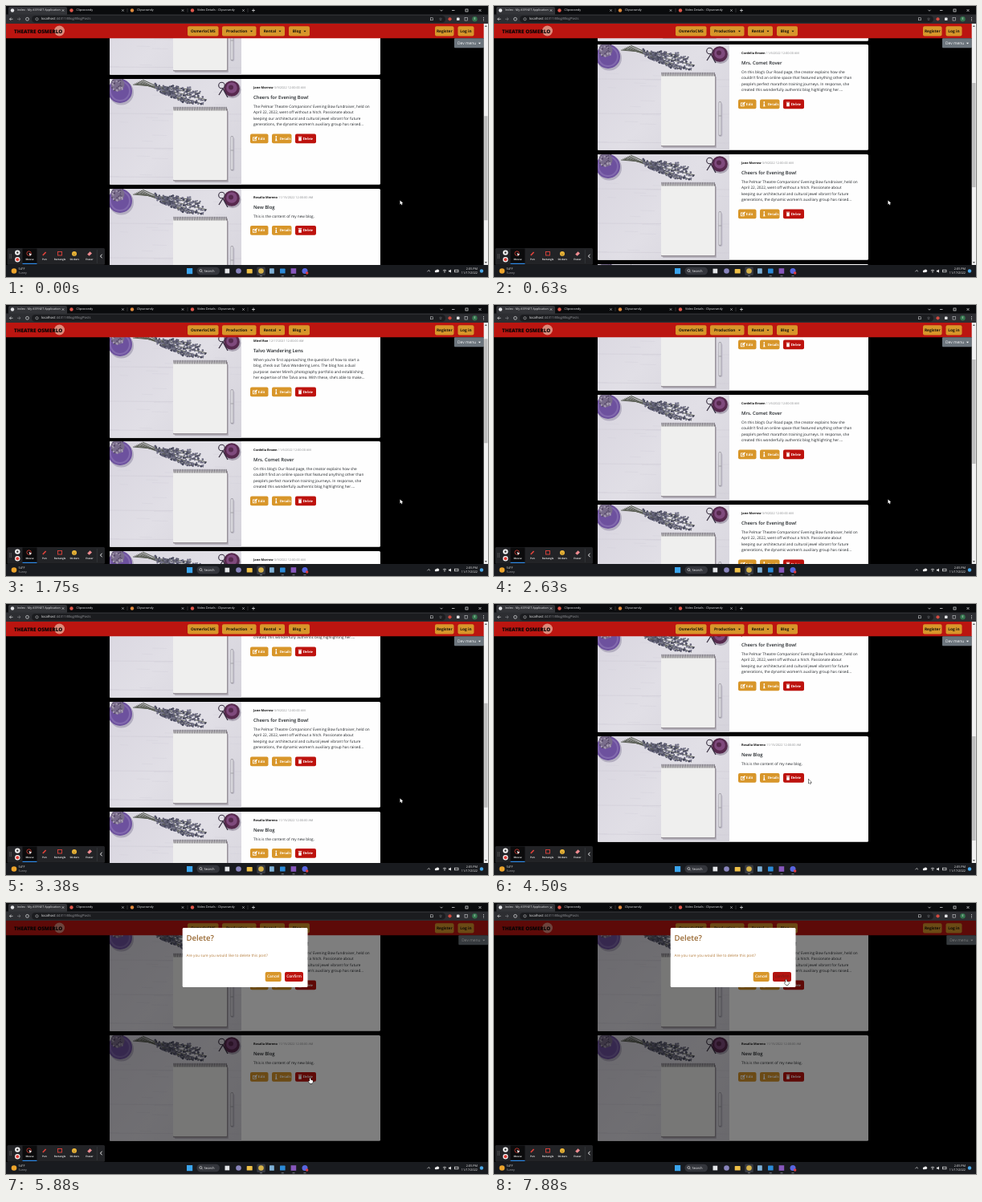
Write an HTML page with a canvas that moves like this. It is 600x338 px and loops after 8 s.

```html
<!DOCTYPE html>
<html lang="en">
<head>
<meta charset="utf-8">
<title>Blog posts</title>
<style>
html, body { margin: 0; width: 100%; height: 100%; overflow: hidden; background: #000; }
canvas { display: block; width: 600px; height: 338px; }
</style>
</head>
<body>
<canvas id="stage"></canvas>
<script>
const LOOP = 8000, STEP = 125, PITCH = 136.7, CARD_H = 131.7;
const GOLD = '#d8962a', RED = '#bd120d', SANS = '"Open Sans", sans-serif', SERIF = '"Liberation Serif", serif';
const canvas = document.getElementById('stage');
const dpr = window.devicePixelRatio || 1;
canvas.width = 600 * dpr;
canvas.height = 338 * dpr;
const c = canvas.getContext('2d');
c.scale(dpr, dpr);
c.textRendering = 'geometricPrecision';

const cards = [
  { who: 'Mirel Roe', date: '12/17/2021', title: 'Talvo Wandering Lens', body: [
    'When you\u2019re first approaching the question of how to start a',
    'blog, check out Talvo Wandering Lens. The blog has a dual',
    'purpose: owner Mirel\u2019s photography portfolio and establishing',
    'her expertise of the Talvo area. With these, she\u2019s able to make...'] },
  { who: 'Cordelia Brown', date: '11/6/2022', title: 'Mrs. Comet Rover', body: [
    'On this blog\u2019s Our Road page, the creator explains how she',
    'couldn\u2019t find an online space that featured anything other than',
    'people\u2019s perfect marathon training journeys. In response, she',
    'created this wonderfully authentic blog highlighting her....'] },
  { who: 'Jane Morrow', date: '5/9/2022', title: 'Cheers for Evening Bow!', body: [
    'The Pelmar Theatre Companions\u2019 Evening Bow fundraiser, held on',
    'April 22, 2022, went off without a hitch. Passionate about',
    'keeping our architectural and cultural jewel vibrant for future',
    'generations, the dynamic women\u2019s auxiliary group has raised...'] },
  { who: 'Rosalia Moreno', date: '11/15/2022', title: 'New Blog', body: ['This is the content of my new blog.'] }
];

// Keyframes: [time, value...]
const scrollKeys = [[0, 91], [625, 185], [1750, 307], [2000, 312], [2250, 312], [3375, 122], [3875, 28]];
const mouseKeys = [[0, 490.5, 242.5], [4000, 490.5, 242.5], [4500, 391.5, 218.5], [4750, 378.5, 218.5],
  [6125, 378.5, 218.5], [6875, 366, 108], [7125, 363.5, 95.5]];

function track(keys, t) {
  const i = keys.findIndex(k => k[0] > t);
  if (i < 0) return keys[keys.length - 1].slice(1);
  const a = keys[i - 1], b = keys[i], p = (t - a[0]) / (b[0] - a[0]);
  return a.slice(1).map((v, j) => v + (b[j + 1] - v) * p);
}

function rect(x, y, w, h, fill, r = 0) {
  c.fillStyle = fill;
  c.beginPath();
  c.roundRect(x, y, w, h, r);
  c.fill();
}
function disc(x, y, r, fill) {
  c.fillStyle = fill;
  c.beginPath();
  c.arc(x, y, r, 0, 7);
  c.fill();
}
function ring(x, y, r, color, width) {
  c.strokeStyle = color;
  c.lineWidth = width;
  c.beginPath();
  c.arc(x, y, r, 0, 7);
  c.stroke();
}
function line(color, width, ...p) {
  c.strokeStyle = color;
  c.lineWidth = width;
  c.beginPath();
  for (let i = 0; i < p.length; i += 2) c.lineTo(p[i], p[i + 1]);
  c.stroke();
}
function shape(fill, ...p) {
  c.fillStyle = fill;
  c.beginPath();
  for (let i = 0; i < p.length; i += 2) c.lineTo(p[i], p[i + 1]);
  c.closePath();
  c.fill();
}
function text(s, x, y, size, color, weight = 400, align = 'left', family = SANS) {
  c.font = `${weight} ${size}px ${family}`;
  c.fillStyle = color;
  c.textAlign = align;
  c.textBaseline = 'middle';
  c.fillText(s, x, y);
  return c.measureText(s).width;
}
function caret(x, y, color) { shape(color, x - 1.5, y - .8, x + 1.5, y - .8, x, y + .9); }

function photo() {
  c.save();
  c.beginPath();
  c.rect(0, 0, 164, CARD_H);
  c.clip();
  const wood = c.createLinearGradient(0, 0, 164, CARD_H);
  wood.addColorStop(0, '#d8d5df');
  wood.addColorStop(.5, '#e1dfe6');
  wood.addColorStop(1, '#d5d3db');
  rect(0, 0, 164, CARD_H, wood);
  for (const y of [43, 86, 122]) line('#cfccd6', .6, 0, y, 164, y + 1);

  let seed = 7;
  const rnd = () => (seed = seed * 16807 % 2147483647) / 2147483647;
  for (let i = 0; i < 30; i++) {
    const x = rnd() * 160, y = rnd() * CARD_H;
    line('#d1ced8', .4, x, y, x + 8 + rnd() * 16, y + .5);
  }

  // lavender stems and heads
  const tips = [[102, 13], [113, 18], [121, 26], [117, 32], [104, 31], [92, 28], [82, 20]];
  tips.forEach(([x, y], i) => {
    const sx = 29 + i * 2, sy = 7 - i;
    line('#5d6158', 1.1, sx, sy, x, y);
    for (let k = 0; k < 42; k++) {
      const p = .38 + rnd() * .62;
      disc(sx + (x - sx) * p, sy + (y - sy) * p + (rnd() - .5) * 5, .7 + rnd() * .8,
        ['#45465a', '#5c5b70', '#747389'][k % 3]);
    }
  });

  // pot of blossoms
  disc(14.5, 17, 15.5, '#b3aec0');
  disc(13, 15, 15, '#6d519e');
  ring(13, 15, 12, '#8269ae', 2);
  disc(10, 7, 8.5, '#7a6d8c');
  for (let k = 0; k < 30; k++) disc(3 + rnd() * 14, rnd() * 15, 1, k % 2 ? '#aaa0b4' : '#574a68');

  // candle and twine
  disc(153, 13.5, 10.5, '#aaa4b3');
  disc(152, 12, 9.8, '#56294d');
  disc(152, 11, 6.8, '#7f4a7d');
  disc(151, 10.5, 3, '#56294d');
  ring(139.5, 8, 3.8, '#352c3e', 1.1);
  line('#352c3e', 1.3, 141, 12, 136, 20);
  line('#352c3e', 1.3, 141, 12, 147, 23);

  // notepad
  rect(81, 40, 67, 89, '#b5b1bb', 1);
  rect(79, 37, 68, 90.5, '#99939a', 1);
  rect(79, 37, 67, 89, '#efefee', .8);
  for (let x = 80; x < 146; x += 2.1) line('#4b474f', .9, x, 34.8, x + .4, 39.5);

  // pen
  rect(151.5, 73, 4, 42, '#c1becb', 2);
  rect(150.5, 71, 3.7, 43.5, '#a3a1a9', 1.7);
  rect(151.2, 72, 2.2, 41, '#dddce1', 1);
  line('#85838b', .6, 150.5, 89, 154.2, 89);
  c.restore();
}

function cardButton(x, y, w, label, fill) {
  rect(x, y, w, 11.7, fill, 2);
  text(label, x + 9.7, y + 6, 4.7, '#fff', 700, 'left', SERIF);
}

function card({ who, date, title, body }, top) {
  const y = Math.round(top);
  if (y > 323 || y + CARD_H < 22) return;
  c.save();
  c.translate(129, y);
  rect(0, 0, 337, CARD_H, '#fefefe', 1.5);
  photo();
  const w = text(who, 179, 10.7, 3.9, '#111', 700);
  text(`${date} 12:00:00 AM`, 180.2 + w, 10.7, 3.8, '#85878a');
  text(title, 179, 23.3, 5.9, '#212529', 600);
  body.forEach((s, i) => text(s, 179, 34.7 + i * 7.5, 4.72, '#212529'));
  const by = 46 + (body.length - 1) * 7.5;
  cardButton(175, by, 22.5, 'Edit', GOLD);
  cardButton(202, by, 24.5, 'Details', GOLD);
  cardButton(231, by, 26, 'Delete', RED);
  // pencil, info and bin
  c.strokeStyle = '#fff';
  c.lineWidth = .8;
  c.strokeRect(178.5, by + 4.4, 3.8, 3.9);
  line('#fff', 1.3, 180.3, by + 6.8, 183.5, by + 3.4);
  disc(207.3, by + 3.5, .9, '#fff');
  rect(206.6, by + 4.9, 1.4, 3.6, '#fff');
  rect(206, by + 8, 2.7, .8, '#fff');
  rect(234.8, by + 3.2, 4.4, .9, '#fff');
  rect(235.2, by + 4.5, 3.6, 4.3, '#fff', .4);
  c.restore();
}

function navButton(x, w, label, menu) {
  rect(x, 25.2, w, 12.4, GOLD, 2);
  text(label, x + w / 2 - (menu ? 3 : 0), 31.3, 4.8, '#17120a', 700, 'center');
  if (menu) caret(x + w - 6, 31.5, '#17120a');
}

function page(y, modal) {
  rect(0, 22, 600, 301, '#000');
  cards.forEach((item, i) => card(item, y + (i - 2) * PITCH));
  rect(0, 22, 600, 18.3, '#bb1510');
  disc(66.5, 31, 6.5, '#dc8a7a');
  text('THEATRE OSMERLO', 10, 32, 6.3, '#0c0606', 800);
  navButton(226, 38.5, 'OsmerloCMS');
  navButton(269, 42.5, 'Production', true);
  navButton(316, 31, 'Rental', true);
  navButton(352, 26, 'Blog', true);
  navButton(534, 23.5, 'Register');
  navButton(562.5, 20, 'Log in');
  const shift = modal ? 5.3 : 0;
  rect(558 + shift, 40.3, 36.7, 12, '#6c757d', 1);
  text('Dev menu', 562 + shift, 46.3, 4.9, '#fff');
  caret(589.5 + shift, 46.5, '#fff');
  if (!modal) {
    rect(594.7, 22, 5.3, 301, '#f1f1f1');
    rect(595.2, 165 - (y - 28) * .44, 4.3, 130, '#bdbdbd');
    shape('#555', 595.9, 26, 598.9, 26, 597.4, 24);
    shape('#555', 595.9, 319, 598.9, 319, 597.4, 321);
  }
}

function dialog(p, hover) {
  rect(0, 22, 600, 301, `rgba(0,0,0,${.5 * p})`);
  c.save();
  c.globalAlpha = p;
  c.beginPath();
  c.rect(0, 22, 600, 301);
  c.clip();
  c.translate(0, -15 * (1 - p));
  rect(219.7, 31, 155.8, 74, '#fff', 1.5);
  text('Delete?', 224.5, 44.5, 9.6, '#97662f', 600);
  text('Are you sure you would like to delete this post?', 224.5, 65.3, 4.65, '#b47c3c');
  rect(322.7, 86, 20, 12, GOLD, 2);
  text('Cancel', 332.7, 92.2, 4.8, '#fff', 600, 'center');
  rect(347, 86, 23, 12, hover ? '#b3140f' : RED, 2);
  text('Confirm', 358.5, 92.2, 4.8, hover ? '#7c1b16' : '#fff', 600, 'center');
  c.restore();
}

function browser() {
  const ink = '#e6e7e9';
  rect(0, 0, 600, 11, '#0a0b0d');
  rect(3, 1, 73, 11, '#333438', 2);
  rect(0, 10.5, 600, 11.5, '#2d2e32');
  const tab = (x, label, color, close) => {
    disc(x, 5.5, 2.2, color);
    text(label, x + 6, 5.5, 3.75, ink);
    line(ink, .6, close - 1.2, 4.3, close + 1.2, 6.7);
    line(ink, .6, close + 1.2, 4.3, close - 1.2, 6.7);
  };
  tab(8, 'Index - My ASP.NET Application', '#e4e5e8', 71);
  tab(81.5, 'Clipvorandy', '#e0564a', 145.5);
  tab(157, 'Clipvorandy', '#e08a3c', 220);
  tab(232, 'Video Details - Clipvorandy', '#e0564a', 295.5);
  for (const x of [151, 226, 301]) line('#55565a', .5, x, 3, x, 8);
  line(ink, .7, 306, 5.5, 310, 5.5);
  line(ink, .7, 308, 3.5, 308, 7.5);
  line(ink, .7, 540.5, 4.8, 542, 6.3, 543.5, 4.8);
  line(ink, .7, 555, 5.5, 558.5, 5.5);
  c.strokeRect(572, 4, 3, 3);
  line(ink, .7, 588.5, 4, 591.5, 7);
  line(ink, .7, 591.5, 4, 588.5, 7);

  line(ink, .7, 8.5, 16.3, 4.5, 16.3, 6.3, 14.5);
  line(ink, .7, 4.5, 16.3, 6.3, 18.1);
  line('#85868a', .7, 14, 16.3, 18, 16.3, 16.2, 14.5);
  line('#85868a', .7, 18, 16.3, 16.2, 18.1);
  ring(26.5, 16.3, 1.9, ink, .7);
  rect(32, 12, 515, 8.8, '#1b1c1f', 4.4);
  ring(38.5, 16.3, 1.6, ink, .5);
  const w = text('localhost', 44, 16.3, 4.2, '#f3f3f4');
  text(':44311/Blog/BlogPosts', 44 + w, 16.3, 4.2, '#9a9ba0');
  c.strokeRect(528.5, 14.8, 3, 3);
  text('\u2606', 541, 16.4, 5, ink, 400, 'center', '"DejaVu Sans", sans-serif');
  disc(552.5, 16.3, 2.1, '#d34a40');
  rect(561, 14.6, 3.5, 3.5, ink, .7);
  c.strokeStyle = ink;
  c.strokeRect(571, 14.6, 3.5, 3.5);
  disc(583.5, 16.3, 3.2, '#33754d');
  text('E', 583.5, 16.4, 3.6, '#fff', 400, 'center');
  for (const y of [14.5, 16.3, 18.1]) disc(594.5, y, .5, ink);
}

function toolbar() {
  rect(1.5, 302, 121.5, 20.7, '#222326', 1.5);
  for (let i = 0; i < 6; i++) disc(4.8 + i % 2 * 1.8, 310 + (i >> 1) * 2, .5, '#888');
  disc(14.3, 307.6, 3.2, '#f4f4f4');
  rect(13.2, 306.5, 2.2, 2.2, '#333');
  disc(14.3, 316.3, 3.2, '#f4f4f4');
  disc(14.3, 316.3, 2, '#d93832');
  rect(20.5, 302.5, 18, 19.5, '#0b0b0c');
  rect(20.5, 320.8, 18, 1.2, '#2f8be8');
  ring(28.6, 308.6, 2.7, '#df4036', .8);
  shape('#fff', 28.6, 308, 32.4, 310, 30.7, 310.5, 30, 312.2);
  line('#e2433b', 1.7, 45.8, 311, 49.6, 307);
  c.strokeStyle = '#e2433b';
  c.lineWidth = .9;
  c.strokeRect(64.5, 306.5, 5, 4.5);
  disc(85, 309, 3, '#f0b93a');
  disc(84, 308.3, .4, '#553c08');
  disc(86, 308.3, .4, '#553c08');
  line('#553c08', .5, 83.7, 310, 85, 310.6, 86.3, 310);
  shape('#ef8c91', 101.2, 309.7, 104.5, 306.3, 107, 308.5, 103.7, 311.7);
  ['Mouse', 'Pen', 'Rectangle', 'Stickers', 'Eraser'].forEach((s, i) =>
    text(s, [29.5, 47.8, 67, 85.2, 104][i], 316.3, 3.1, '#fff', 600, 'center'));
  line('#45464a', .5, 113.3, 304, 113.3, 321);
  line('#fff', .9, 119.5, 309.7, 117.5, 312, 119.5, 314.3);
}

function taskbar() {
  rect(0, 323, 600, 15, '#191b1f');
  disc(10, 330.5, 3.3, '#eda42b');
  text('54\u00b0F', 15.5, 328, 3.8, '#f1f1f1');
  text('Sunny', 15.5, 333.2, 3.6, '#a7a8ac');
  rect(225, 327, 7.2, 7.2, '#3aa5ee');
  rect(237.5, 325.7, 28.5, 9.6, '#34363c', 4.8);
  ring(242.4, 330, 1.5, '#eee', .6);
  line('#eee', .6, 243.5, 331.1, 244.8, 332.4);
  text('Search', 246.5, 330.5, 4.2, '#ececee');
  rect(312.3, 325.5, 10.5, 10.5, '#373a42', 1.5);
  rect(272.5, 327.7, 5.7, 5.7, '#e3e5e8');
  disc(289.5, 330.5, 3.3, '#8985bd');
  rect(299.7, 328, 7, 5.6, '#efc047', .7);
  disc(317.5, 330.5, 3.3, '#d6b34a');
  rect(328, 327.3, 5.8, 6.5, '#7fb2d8', .6);
  rect(341, 327.6, 6.6, 6, '#2b8ad8', .6);
  rect(354.6, 327.2, 6.6, 6.6, '#8757bd');
  disc(372, 330.5, 3.5, '#5865e0');
  disc(374.7, 333, 1.7, '#df3e42');
  for (const x of [317.5, 344.3, 358, 372]) line('#9ba3ad', .7, x - 1.5, 336.7, x + 1.5, 336.7);
  line('#eee', .7, 524.5, 331.3, 526.2, 329.5, 528, 331.3);
  disc(535.2, 331, 1.4, '#eee');
  disc(537.2, 330.3, 1.9, '#eee');
  c.strokeStyle = '#eee';
  c.lineWidth = .7;
  for (const r of [1.5, 3]) {
    c.beginPath();
    c.arc(546, 332.2, r, Math.PI * 1.25, Math.PI * 1.75);
    c.stroke();
  }
  disc(546, 332, .6, '#eee');
  shape('#eee', 551, 329.8, 552.5, 329.8, 554, 328.5, 554, 332.7, 552.5, 331.4, 551, 331.4);
  c.strokeRect(558.5, 329.2, 4.5, 2.6);
  text('2:05 PM', 587, 327.8, 3.8, '#f1f1f1', 400, 'right');
  text('11/17/2022', 587, 333.2, 3.8, '#f1f1f1', 400, 'right');
  disc(592, 330.5, 2.2, '#4aa8e8');
}

function pointer([x, y], hand) {
  const p = hand
    ? [-.5, 0, .7, 0, .8, 2.2, 3.3, 2.8, 3.5, 4.8, 2.7, 6.6, -.2, 6.6, -2, 4, -1.5, 3.4, -.5, 4.1]
    : [0, 0, 0, 5, 1.2, 4, 2, 5.8, 2.9, 5.4, 2.1, 3.7, 3.7, 3.6];
  const q = p.map((v, i) => v + (i % 2 ? y : x));
  line('#111', 1, ...q, q[0], q[1]);
  shape('#fff', ...q);
}

function draw(t) {
  const fade = Math.min(1, Math.max(0, (t - 5250) / 375));
  const onConfirm = t >= 7000;
  page(track(scrollKeys, t)[0], fade > 0);
  if (fade > 0) dialog(fade, onConfirm);
  browser();
  toolbar();
  taskbar();
  pointer(track(mouseKeys, t), onConfirm || (t > 4600 && t < 6200));
}

function tick() {
  const t = performance.now() % LOOP;
  draw(Math.floor(t / STEP) * STEP);
  requestAnimationFrame(tick);
}
tick();
</script>
</body>
</html>
```
